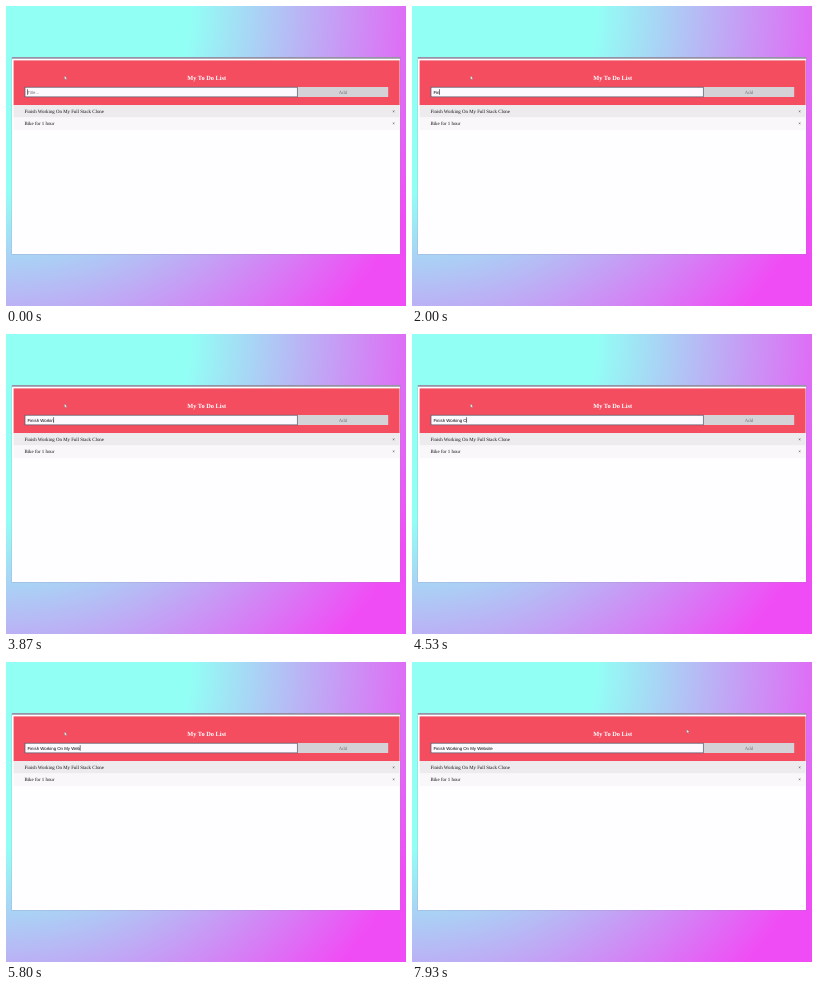
Recreate the animation shown at these times as an HTML page. Size 400 px wide and 300 px high, loop 8000 ms.

```html
<!DOCTYPE html>
<html lang="en">
<head>
<meta charset="utf-8">
<title>My To Do List</title>
<style>
  html, body { margin: 0; width: 100%; height: 100%; overflow: hidden; }
  svg { display: block; width: 100%; height: 100%; }
  text { white-space: pre; text-rendering: geometricPrecision; }
  .serif { font-family: "Liberation Serif", "Times New Roman", serif; font-size: 4.88px; fill: #111; }
  .sans { font-family: "Liberation Sans", Arial, sans-serif; font-size: 4.34px; fill: #000; }
  .title { font-size: 6.35px; font-weight: bold; fill: #fff; }
  .mid { text-anchor: middle; }
  .dim { fill: #77747a; }
</style>
</head>
<body>
<svg viewBox="0 0 400 300" preserveAspectRatio="none">
  <defs>
    <radialGradient id="sky" gradientUnits="userSpaceOnUse" cx="0" cy="0" r="450">
      <stop offset=".41" stop-color="#92fff5"/>
      <stop offset="1" stop-color="#f04cf5"/>
    </radialGradient>
  </defs>
  <rect width="400" height="300" fill="url(#sky)"/>

  <rect x="5.6" y="51" width="388.8" height="197.5" fill="#8c86a8" opacity=".4"/>
  <rect x="6" y="51" width="388" height="197" fill="#fefdff"/>
  <rect x="6" y="51.2" width="388" height="1.4" fill="#7d7890"/>
  <rect x="7.6" y="54.4" width="386" height="44.8" fill="#f44d60"/>
  <rect x="7.6" y="99.2" width="386" height="12.3" fill="#eeebee"/>
  <rect x="7.6" y="111.5" width="386" height="12.5" fill="#f9f7fa"/>

  <text class="serif title mid" x="200.7" y="74">My To Do List</text>
  <rect x="291" y="81" width="91.2" height="10" fill="#d4d1d7"/>
  <text class="serif mid dim" x="337" y="87.8">Add</text>
  <rect x="19" y="81.2" width="272.3" height="9.7" fill="#fdfaff" stroke="#4e5a68" stroke-width=".7"/>

  <text class="serif" x="18.5" y="107.2">Finish Working On My Full Stack Clone</text>
  <text class="serif" x="18.5" y="119.4">Bike for 1 hour</text>
  <text class="serif mid" x="387.6" y="107.2">×</text>
  <text class="serif mid" x="387.6" y="119.4">×</text>

  <text id="hint" class="sans dim" x="21.5" y="87.6">Title...</text>
  <text id="entry" class="sans" x="21.5" y="87.6"></text>
  <rect id="caret" y="83.2" width=".6" height="5.6" fill="#222"/>
  <path id="pointer" d="M0 0V3.6L.9 2.9L1.5 4.1L2.1 3.8L1.6 2.6H2.7Z" fill="#fff" stroke="#555" stroke-width=".3"/>
</svg>
<script>
  const LOOP = 8000, LEFT = 21.5;
  // Each burst is typed evenly from its first key press to its last
  const BURSTS = [
    { text: "Finish ", from: 1530, to: 2600 },
    { text: "Working ", from: 3270, to: 4000 },
    { text: "On My ", from: 4470, to: 4870 },
    { text: "Web", from: 5470, to: 5800 },
    { text: "site", from: 6330, to: 6930 }
  ];
  const [hint, entry, caret, pointer] =
    ["hint", "entry", "caret", "pointer"].map(id => document.getElementById(id));

  const clamp = v => Math.min(1, Math.max(0, v));
  const smooth = v => v * v * (3 - 2 * v);
  const mix = (a, b, v) => a + (b - a) * v;

  function typedPart({ text, from, to }, t) {
    if (t < from) return "";
    const keys = 1 + Math.floor(clamp((t - from) / (to - from)) * (text.length - 1));
    return text.slice(0, keys);
  }

  function draw(t) {
    const typed = BURSTS.map(b => typedPart(b, t)).join("");
    if (entry.textContent !== typed) entry.textContent = typed;
    hint.style.display = typed ? "none" : "";

    const caretOff = (t >= 1270 && !typed) || t >= 7330;
    caret.style.display = caretOff ? "none" : "";
    caret.setAttribute("x", LEFT - .2 + (typed ? entry.getComputedTextLength() : 0));

    const move = smooth(clamp((t - 7730) / 200));
    pointer.setAttribute("transform", `translate(${mix(58.5, 274.7, move)} ${mix(69.8, 67.5, move)})`);
  }

  const start = performance.now();
  function tick() {
    draw((performance.now() - start) % LOOP);
    requestAnimationFrame(tick);
  }
  tick();
</script>
</body>
</html>
```
